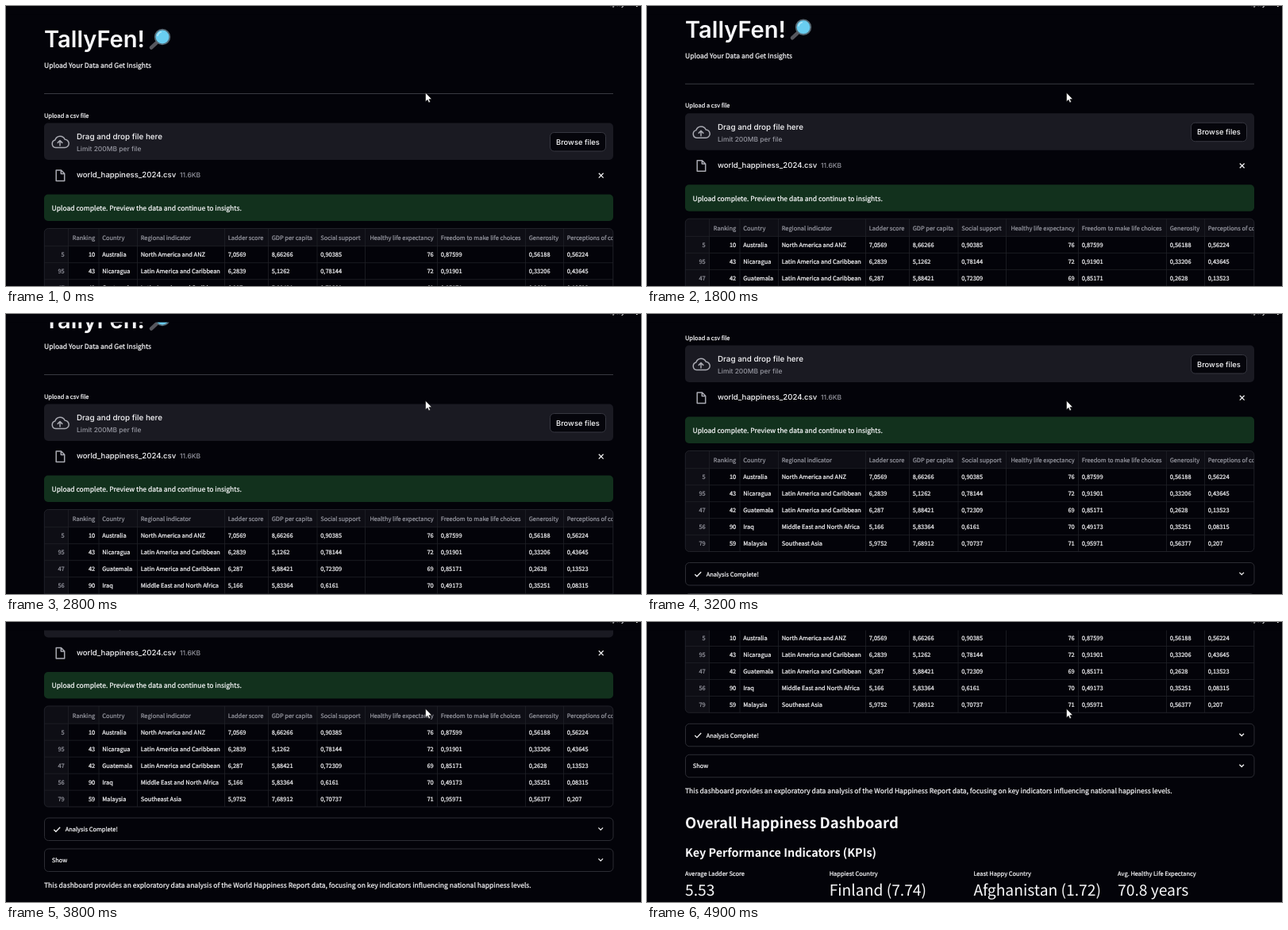
Recreate the animation shown at these times as an HTML page. Size 800x353 px, loop 5000 ms.

```html
<!DOCTYPE html>
<html lang="en">
<head>
<meta charset="utf-8">
<title>Data dashboard</title>
<style>
  html, body { margin: 0; width: 100%; height: 100%; overflow: hidden; background: #030309; }
  svg { display: block; width: 800px; height: 353px; }
  text {
    font-family: "Noto Sans CJK JP", "Noto Sans CJK SC", "Noto Sans CJK", "Open Sans", sans-serif;
    text-rendering: geometricPrecision; white-space: pre;
    fill: #f8f8fa; stroke: #f8f8fa; stroke-width: .22;
  }
  .dim { fill: #9697a0; stroke: #9697a0; }
  .ui { font-family: Inter, Roboto, sans-serif; font-weight: 500; }
  .ui, .big { stroke: none; }
  .line { fill: none; stroke: #f0f0f2; stroke-width: 1.3; }
  .icon { fill: none; stroke: #a9aab2; stroke-width: 1.5; stroke-linejoin: round; stroke-linecap: round; }
</style>
</head>
<body>
<svg viewBox="0 0 800 353">
  <defs><clipPath id="frame"><rect x="48" y="280.5" width="717" height="127" rx="5"/></clipPath></defs>
  <g id="page"></g>
  <rect width="800" height="10.5" fill="#030309"/>
  <text x="754.5" y="0.3" font-size="7.6">Deploy</text>
  <rect x="794" y="0" width="1.6" height="1" fill="#e6e6e9"/>
  <path d="M528.6 109.4v11l2.5-2.2 1.6 3.6 1.8-.8-1.6-3.5 3.3-.3z" fill="#fff" stroke="#111" stroke-width=".5"/>
</svg>
<script>
const BODY = 8.56, SMALL = 7.46;
const out = [];
const add = markup => out.push(markup);
const text = (x, y, size, str, cls = '', extra = '') =>
  add(`<text x="${x}" y="${y}" font-size="${size}" class="${cls}" ${extra}>${str}</text>`);
const box = (x, y, w, h, fill, stroke = 'none') =>
  add(`<rect x="${x}" y="${y}" width="${w}" height="${h}" rx="5" fill="${fill}" stroke="${stroke}"/>`);
const path = (d, cls, extra = '') => add(`<path d="${d}" class="${cls}" ${extra}/>`);

function header() {
  text(48, 52, 29.1, 'TallyFen!', 'ui', 'style="font-weight:600"');
  add(`<path d="M189.5 46.5L183 52.5" stroke="#55565d" stroke-width="4.6" stroke-linecap="round"/>
    <circle cx="197" cy="39" r="9.3" fill="#69cdf0" stroke="#566873" stroke-width="1.8"/>
    <path d="M190.8 38a6.5 6.5 0 0 1 5-5.2" fill="none" stroke="#b5e9fa" stroke-width="1.5"/>`);
  text(48, 78, BODY, 'Upload Your Data and Get Insights');
  path('M48 110.5H765', '', 'stroke="#393a41"');
}

function uploader() {
  text(48, 140.5, SMALL, 'Upload a csv file');
  box(48, 147.5, 717, 46.5, '#1a1a22');
  path('M62.5 178.5a4.9 4.9 0 0 1-.6-9.6a6.5 6.5 0 0 1 12.3-.6a5.1 5.1 0 0 1-.2 10.2zM68 176v-6M65.2 172.4l2.8-2.8 2.8 2.8', 'icon');
  text(89, 167.8, 9.85, 'Drag and drop file here', 'ui');
  text(89, 183, 8.45, 'Limit 200MB per file', 'ui dim');
  box(685.5, 159.5, 70, 23.5, '#05050b', '#363740');
  text(693, 174.5, 9.4, 'Browse files', 'ui');

  path('M63.2 207h6.3l4.2 4.2v9.3h-10.5zM69.3 207.2v4.2h4.2', 'icon');
  text(89, 216.3, 9.6, 'world_happiness_2024.csv', 'ui');
  text(219, 216.3, 8.5, '11.6KB', 'ui dim');
  path('M746.8 210.8l5.8 5.8M752.6 210.8l-5.8 5.8', 'line');

  box(48, 237.5, 717, 33.5, '#12311d');
  text(57.5, 257.8, BODY, 'Upload complete. Preview the data and continue to insights.');
}

function table() {
  const edges = [48, 78.5, 117, 165.5, 275.5, 330.5, 392, 452.5, 543.5, 654.5, 702.5, 840];
  const rightCols = [0, 1, 7];
  const rows = [
    '|Ranking|Country|Regional indicator|Ladder score|GDP per capita|Social support|Healthy life expectancy|Freedom to make life choices|Generosity|Perceptions of corruption',
    '5|10|Australia|North America and ANZ|7,0569|8,66266|0,90385|76|0,87599|0,56188|0,56224',
    '95|43|Nicaragua|Latin America and Caribbean|6,2839|5,1262|0,78144|72|0,91901|0,33206|0,43645',
    '47|42|Guatemala|Latin America and Caribbean|6,287|5,88421|0,72309|69|0,85171|0,2628|0,13523',
    '56|90|Iraq|Middle East and North Africa|5,166|5,83364|0,6161|70|0,49173|0,35251|0,08315',
    '79|59|Malaysia|Southeast Asia|5,9752|7,68912|0,70737|71|0,95971|0,56377|0,207'
  ];
  add('<g clip-path="url(#frame)"><path d="M48 280H765V302.8H78.5V408H48z" fill="#0e0e15"/>');
  const grid = edges.slice(1, -1).map(x => `M${x} 280V408`).join('') +
    [0, 1, 2, 3, 4].map(i => `M48 ${302.7 + 21 * i}H765`).join('');
  path(grid, '', 'stroke="#202128" stroke-width=".8"');
  rows.forEach((row, r) => row.split('|').forEach((cell, c) => {
    const right = rightCols.includes(c);
    const x = right ? edges[c + 1] - 4.8 : edges[c] + 4.2;
    text(x, r ? 295.1 + 21 * r : 295, SMALL, cell, r && c ? '' : 'dim', right ? 'text-anchor="end"' : '');
  }));
  add('</g>');
  box(48.3, 280.5, 716.5, 127, 'none', '#202128');
}

function dashboard() {
  for (const y of [421.5, 460.5]) {
    box(48.5, y, 716.5, 28.5, 'none', '#2c2d34');
    path(`M746.4 ${y + 12.4}l2.8 2.8 2.8-2.8`, 'line');
  }
  path('M60.3 436.2l2.6 2.6 5.3-5.6', 'line');
  text(74.7, 438.8, SMALL, 'Analysis Complete!');
  text(57.7, 477.3, SMALL, 'Show');
  text(48, 509.3, BODY, 'This dashboard provides an exploratory data analysis of the World Happiness Report data, focusing on key indicators influencing national happiness levels.');
  text(48, 553, 18.55, 'Overall Happiness Dashboard', 'big', 'font-weight="600"');
  text(48, 589, 14.4, 'Key Performance Indicators (KPIs)', 'big', 'font-weight="600"');
  [
    ['Average Ladder Score', '5.53'],
    ['Happiest Country', 'Finland (7.74)'],
    ['Least Happy Country', 'Afghanistan (1.72)'],
    ['Avg. Healthy Life Expectancy', '70.8 years']
  ].forEach(([label, value], i) => {
    const x = 48 + 181.7 * i;
    text(x, 613, SMALL, label);
    text(x, 638.3, 19.25, value, 'big');
  });
}

header();
uploader();
table();
dashboard();
const page = document.getElementById('page');
page.innerHTML = out.join('');

// Scroll position as [ms, px] stops
const stops = [[0, 0], [1400, 0], [2100, 21.5], [2300, 31.5], [2400, 31.5], [2600, 33.5],
  [2700, 33.5], [2800, 34], [3200, 108], [3800, 174.5], [5000, 304]];

function scrollAt(t) {
  const i = stops.findIndex(s => s[0] > t);
  const [t0, y0] = stops[i - 1], [t1, y1] = stops[i];
  return y0 + (y1 - y0) * (t - t0) / (t1 - t0);
}

function draw(now) {
  const t = Math.floor(now % 5000 / 100) * 100;
  page.setAttribute('transform', `translate(0 ${-scrollAt(t)})`);
  requestAnimationFrame(draw);
}
draw(performance.now());
</script>
</body>
</html>
```
